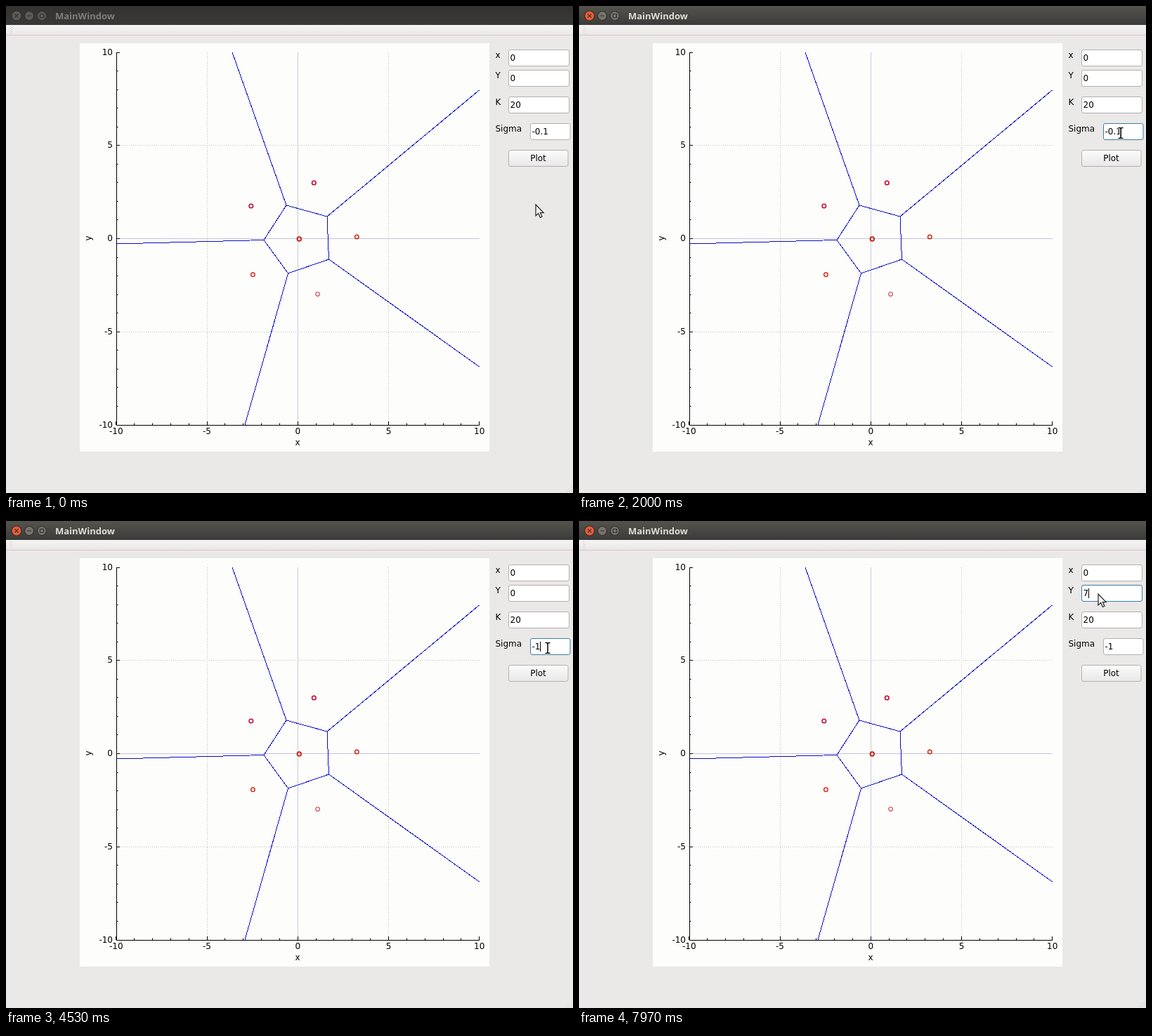
Animation of 807x694 px, one loop 8 s. Source, as an HTML page:

```html
<!DOCTYPE html>
<html lang="en">
<head>
<meta charset="utf-8">
<style>
  html, body { margin: 0; width: 100%; height: 100%; overflow: hidden; }
  body { background: #ebe8e8; }
  svg { display: block; width: 807px; height: 694px; font: 12px "DejaVu Sans", sans-serif; }
  #title { font: 700 13px "Open Sans", sans-serif; }
  .mid { text-anchor: middle; }
  .end { text-anchor: end; }
</style>
</head>
<body>
<svg viewBox="0 0 807 694">
  <defs>
    <linearGradient id="active" x2="0" y2="1"><stop stop-color="#55534c"/><stop offset="1" stop-color="#3d3b3a"/></linearGradient>
    <linearGradient id="inactive" x2="0" y2="1"><stop stop-color="#343230"/><stop offset="1" stop-color="#3b3937"/></linearGradient>
    <linearGradient id="face" x2="0" y2="1"><stop stop-color="#fcfcfb"/><stop offset="1" stop-color="#e9e7e8"/></linearGradient>
    <linearGradient id="strip" x2="0" y2="1"><stop stop-color="#f6f4f3"/><stop offset="1" stop-color="#ebe8e8"/></linearGradient>
  </defs>

  <rect id="bar" width="807" height="27"/>
  <g fill="none" stroke="#33312e" stroke-width="1.2">
    <circle id="close" cx="15" cy="14" r="7"/>
    <circle class="dull" cx="33" cy="14" r="6.5"/>
    <circle class="dull" cx="51" cy="14" r="6.5"/>
    <path d="M12.5 11.5l5 5m0-5l-5 5M30 14h6M48.5 11.5h5v5h-5z"/>
  </g>
  <text id="title" x="70" y="19">MainWindow</text>
  <rect y="27" width="807" height="14" fill="url(#strip)"/>
  <path d="M0 41.5H807" stroke="#dcc8c6"/>
  <path d="M6.5 29V40M8.5 30V40M798 691.5h8M801 688.5h5M804 685.5h2" stroke="#c8c4c4" stroke-dasharray="1 2"/>

  <rect x="105" y="53" width="583" height="582" fill="#fdfdfc"/>
  <g id="plot" fill="none"></g>
  <text class="mid" x="415" y="626">x</text>
  <text class="mid" transform="translate(121 331) rotate(-90)">y</text>

  <g id="form"></g>
  <rect x="715.5" y="205.5" width="84.5" height="23" rx="2.5" fill="url(#face)" stroke="#b4b0af"/>
  <text class="mid" x="757.5" y="221">Plot</text>

  <path id="caret" stroke="#000"/>
  <path id="arrow" d="M0 0V16L3.7 12.6L6.4 18.5L9 17.3L6.4 11.7H11.2Z" fill="#f4f3f5" stroke="#222" stroke-width="1.2"/>
  <g id="beam" fill="none">
    <path id="beamHalo" stroke="#fff" stroke-width="3.6"/>
    <path id="beamCore" stroke="#111" stroke-width="1.6"/>
  </g>
</svg>
<script>
const LOOP = 8000;
const $ = id => document.getElementById(id);

function add(parent, tag, attrs, text = "") {
  const node = document.createElementNS("http://www.w3.org/2000/svg", tag);
  for (const key in attrs) node.setAttribute(key, attrs[key]);
  node.textContent = text;
  return parent.appendChild(node);
}

// Plot: axis values run from -10 to 10 in both directions
const plot = $("plot");
const px = v => 415.25 + v * 25.85;
const py = v => 331.5 - v * 26.55;
const snap = v => Math.floor(v) + 0.5;
const line = (d, stroke, extra = {}) => add(plot, "path", { d, stroke, ...extra });

for (const v of [-5, 0, 5]) {
  const dash = v ? { "stroke-dasharray": "1 2" } : {};
  line(`M${snap(px(v))} 66V597`, v ? "#c0c0b6" : "#c9c9d8", dash);
  line(`M157 ${snap(py(v))}H674`, v ? "#c0c0b6" : "#c4c4dc", dash);
}

line("M322 66L399 284L457 300L673.5 120M457 300L459.5 361L673.5 514M459.5 361" +
     "L401.5 381L340 597M401.5 381L367 333.5L157 339M367 333.5L399 284", "#0a0ac8",
     { "shape-rendering": "crispEdges" });

let ticks = "M157.5 66V597.5H674";
for (let v = -10; v <= 10; v++) {
  const length = v % 5 ? 2.5 : 5;
  ticks += `M${snap(px(v))} 597v${-length}M157 ${snap(py(v))}h${length}`;
  if (v % 5) continue;
  add(plot, "text", { x: px(v), y: 610, class: "mid", fill: "#000" }, v);
  add(plot, "text", { x: 152, y: Math.floor(py(v) + 4), class: "end", fill: "#000" }, v);
}
line(ticks, "#000");

for (const [cx, cy, stroke, width] of [
  [438.3, 252, "#c4002c", 1.5], [348.8, 285, "#c60838", 1.5], [417.3, 332, "#cc1400", 1.7],
  [499.3, 329, "#cc2810", 1.4], [351.4, 382.8, "#d02a18", 1.4], [443.6, 410.6, "#cc4050", 1.1]
]) add(plot, "circle", { cx, cy, r: 2.8, stroke, "stroke-width": width });

// Form fields
function field(label, x, y, width, value) {
  const form = $("form");
  add(form, "text", { x: 696.5, y: y + 11.5 }, label);
  const box = add(form, "rect", { x, y, width, height: 23, rx: 2.5, fill: "#fff", stroke: "#b4b0af" });
  return { x, y, box, text: add(form, "text", { x: x + 2, y: y + 15.5 }, value) };
}
field("x", 715.5, 62.5, 86, "0");
const yField = field("Y", 715.5, 91.5, 86, "0");
field("K", 715.5, 129.5, 86, "20");
const sigmaField = field("Sigma", 746.5, 167.5, 56.5, "-0.1");

for (const id of ["beamHalo", "beamCore"])
  $(id).setAttribute("d", "M-3.5-7.5H-1.5L0-6.5L1.5-7.5H3.5M0-6.5V6.5M-3.5 7.5H-1.5L0 6.5L1.5 7.5H3.5");

// Timeline: [start time, value]
const sigmaTyping = [[0, "-0.1"], [3200, "-0."], [3260, "-0"], [3330, "-"], [3530, "-1"]];
const yTyping = [[0, "0"], [7270, ""], [7500, "7"]];
const focusSteps = [[0, null], [1770, sigmaField], [6070, yField]];
const pointerPath = [
  [30, 754, 283], [400, 757, 252], [830, 769, 203], [1030, 775, 186], [1400, 775, 186],
  [1630, 771, 181], [5100, 771, 181], [5670, 740, 112], [5970, 740, 112], [6070, 732, 107],
  [6500, 732, 107], [6770, 737, 110], [7969, 737, 110], [7970, 739, 104]
];

const stepAt = (steps, t) => steps.findLast(step => t >= step[0])[1];

function pointerAt(t) {
  const next = pointerPath.findIndex(p => p[0] > t);
  if (next === 0) return pointerPath[0].slice(1);
  if (next < 0) return pointerPath.at(-1).slice(1);
  const [t0, x0, y0] = pointerPath[next - 1], [t1, x1, y1] = pointerPath[next];
  const k = (t - t0) / (t1 - t0);
  return [x0 + (x1 - x0) * k, y0 + (y1 - y0) * k];
}

function draw(t) {
  const focus = stepAt(focusSteps, t);
  sigmaField.text.textContent = stepAt(sigmaTyping, t);
  yField.text.textContent = stepAt(yTyping, t);
  for (const f of [sigmaField, yField])
    f.box.setAttribute("stroke", f === focus ? "#397f9f" : "#b4b0af");

  $("bar").setAttribute("fill", focus ? "url(#active)" : "url(#inactive)");
  $("title").setAttribute("fill", focus ? "#e0ded5" : "#807e78");
  $("close").setAttribute("fill", focus ? "#ec5c35" : "#5d5b56");
  document.querySelectorAll(".dull").forEach(c => c.setAttribute("fill", focus ? "#77746d" : "#5d5b56"));

  if (focus) {
    const width = focus.text.textContent ? focus.text.getComputedTextLength() : 0;
    $("caret").setAttribute("d", `M${snap(focus.x + 2.5 + width)} ${focus.y + 4.5}v14`);
  } else $("caret").setAttribute("d", "");

  const [x, y] = pointerAt(t);
  const overField = t < 7970 && ((y > 167 && y < 191) || (y > 91 && y < 115) || (y > 129 && y < 153));
  $("arrow").style.display = overField ? "none" : "";
  $("beam").style.display = overField ? "" : "none";
  $(overField ? "beam" : "arrow").setAttribute("transform", `translate(${x} ${y})`);
}

const start = performance.now();
function tick() {
  draw((performance.now() - start) % LOOP);
  requestAnimationFrame(tick);
}
tick();
</script>
</body>
</html>
```
